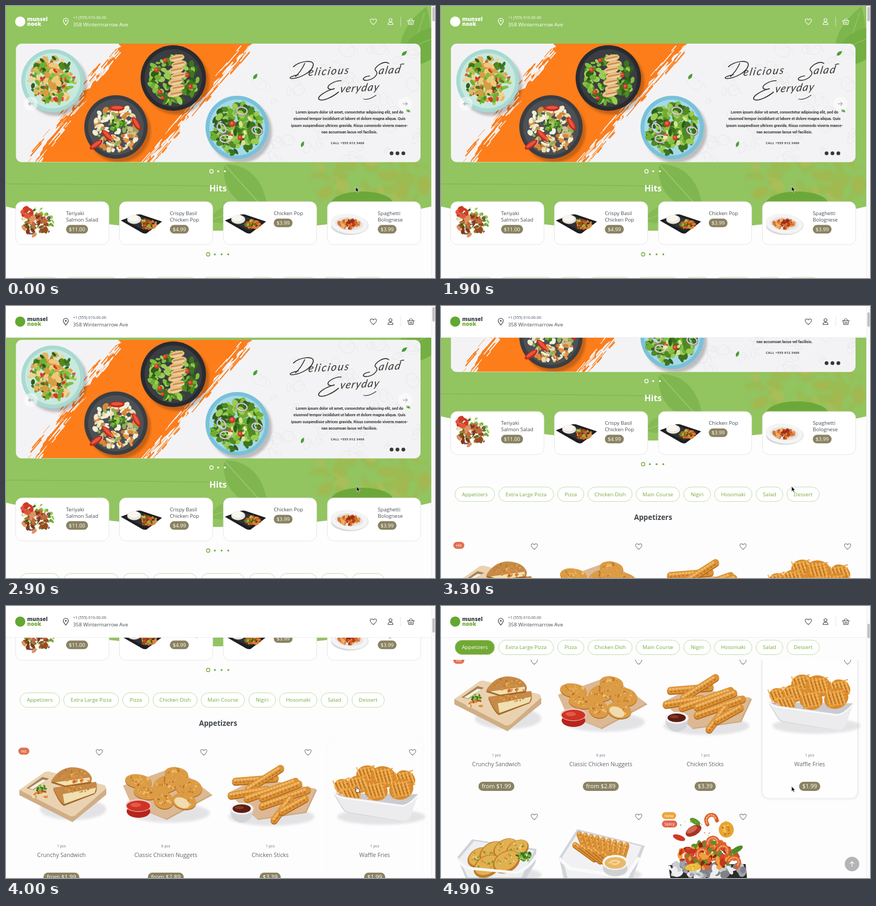
These frames come from a looping animation (800x506 px, 5000 ms). An HTML page:

```html
<!DOCTYPE html>
<html lang="en">
<head>
<meta charset="utf-8">
<title>Food shop</title>
<style>
  html, body { margin: 0; width: 100%; height: 100%; overflow: hidden; background: #fdfdfd; }
  svg { display: block; position: absolute; left: 0; top: 0; }
  text { font-family: "Open Sans", "Noto Sans", sans-serif; }
  .copy { position: absolute; left: 0; top: 0; }
</style>
</head>
<body>
<svg id="stage" width="800" height="506" viewBox="0 0 800 506"></svg>
<script>
const GREEN = '#92c460', LEAF = '#73ab3b', INK = '#474c52', OLIVE = '#8a8261';

let seed = 1;
const rnd = () => (seed = (seed * 16807) % 2147483647) / 2147483647;
const between = (a, b) => a + (b - a) * rnd();
const pick = list => list[Math.floor(rnd() * list.length)];
const n1 = v => v.toFixed(1);

// Drawing helpers return SVG markup.
const el = (x, y, rx, ry, fill, rot = 0, more = '') =>
  `<ellipse rx="${n1(rx)}" ry="${n1(ry)}" fill="${fill}" transform="translate(${n1(x)} ${n1(y)}) rotate(${n1(rot)})" ${more}/>`;
const dot = (x, y, r, fill, more) => el(x, y, r, r, fill, 0, more);
const box = (x, y, w, h, r, fill, more = '') =>
  `<rect x="${x}" y="${y}" width="${w}" height="${h}" rx="${r}" fill="${fill}" ${more}/>`;
const shape = (d, fill, more = '') => `<path d="${d}" fill="${fill}" ${more}/>`;
const line = (d, color, w = 1, more = '') =>
  `<path d="${d}" fill="none" stroke="${color}" stroke-width="${w}" stroke-linecap="round" stroke-linejoin="round" ${more}/>`;
const txt = (x, y, s, size, fill, more = '') =>
  `<text x="${x}" y="${y}" font-size="${size}" fill="${fill}" ${more}>${s}</text>`;
const mid = (x, y, s, size, fill, more = '') => txt(x, y, s, size, fill, 'text-anchor="middle" ' + more);
const at = (x, y, s, more = '') => `<g transform="translate(${x} ${y})" ${more}>${s}</g>`;
const many = (n, f) => Array.from({ length: n }, (_, i) => f(i)).join('');

// Scatter of small rotated blobs inside an ellipse.
function mix(s, n, x, y, rx, ry, colors, lo, hi) {
  seed = s * 7919;
  return many(n, () => {
    const a = between(0, 6.283), d = Math.sqrt(rnd()), r = between(lo, hi);
    return el(x + Math.cos(a) * d * rx, y + Math.sin(a) * d * ry, r, r * between(.4, .8), pick(colors), between(0, 180));
  });
}
const leaf = (x, y, len, w, rot, fill, vein, more = '') =>
  `<g transform="translate(${x} ${y}) rotate(${rot})" ${more}>` +
  shape(`M${-len} 0Q${-len * .2} ${-w * 1.5} ${len} 0Q${-len * .2} ${w * 1.5} ${-len} 0Z`, fill) +
  line(`M${-len} 0H${len * .8}`, vein, len / 40 + .3) + '</g>';
const heart = (x, y, c) => at(x, y, line('M0 5.5C-8-.5-6.5-5-3.3-5C-1.6-5-.5-4 0-3C.5-4 1.6-5 3.3-5C6.5-5 8-.5 0 5.5Z', c, 1.1));
const pill = (x, y, w, s, size, h = 16) =>
  box(x, y - h / 2, w, h, h / 2, OLIVE) + mid(x + w / 2, y + size * .36, s, size, '#fff');
const badge = (x, y, w, s, fill) => box(x, y - 6.5, w, 13, 6.5, fill) + mid(x + w / 2, y + 2.8, s, 7.9, '#fff');
const dots = (x, y, n, c) => dot(x, y, 3.2, 'none', `stroke="${c}" stroke-width="1.4"`) +
  many(n, i => dot(x + 12.5 * (i + 1), y, 1.8, c));

const GREENS = ['#4f8a22', '#6fae32', '#83bf3e', '#3c7420', '#9ccb55', '#2f5d1c'];
const RED = '#cf3a26';

function backdrop() {
  const edge = 'M0 0H793V373Q396 463 0 373Z';
  return `<clipPath id="wave"><path d="${edge}"/></clipPath>` +
    `<filter id="soft"><feGaussianBlur stdDeviation="2"/></filter>` +
    shape(edge, GREEN) + '<g clip-path="url(#wave)">' +
    line('M0 331L180 332L400 335', '#84b652', 1.4) +
    leaf(448, 340, 62, 36, 48, '#7fb64f', '#99c86c') +
    leaf(418, 385, 42, 20, -20, '#85ba54', '#99c86c') +
    '<g filter="url(#soft)" opacity=".5">' +
    mix(3, 95, 690, 318, 125, 58, ['#b3ad3f', '#a5b347', '#c0b852', '#92c460'], 5, 18) + '</g>' +
    el(664, 368, 58, 23, '#6ca839') + leaf(765, 60, 62, 34, -72, '#7cb64c', '#8fc45f') +
    el(780, 75, 48, 27, '#74af43', -35) + line('M735 98Q765 70 793 62', '#8cc05b', 1.5) +
    '</g>';
}

function brush() {
  seed = 4242;
  const edge = (x0, x1) => Array.from({ length: 41 }, (_, i) =>
    `${n1(x0 + (x1 - x0) * i / 40 + between(-5, 5))} ${n1(70 + 5.5 * i)}`);
  const streaks = (x0, x1, c, lo, hi) => many(34, () => {
    const k = rnd(), l = between(7, 24);
    return line(`M${n1(x0 + (x1 - x0) * k + between(lo, hi))} ${n1(70 + 220 * k)}l${n1(-l * .85)} ${n1(l)}`, c, between(.7, 2.6));
  });
  return shape('M' + edge(214, 50).concat(edge(455, 264).reverse()).join('L') + 'Z', '#fd7d1b') +
    streaks(214, 50, '#fd7d1b', -14, 4) + streaks(455, 264, '#fd7d1b', 0, 15) +
    streaks(214, 50, '#f3f3f5', 0, 15) + streaks(455, 264, '#f3f3f5', -14, 5);
}

const plate = (x, y, r, rim, inner) =>
  el(x + 6, y + 7, r, r, '#000', 0, 'opacity=".22" filter="url(#soft)"') + dot(x, y, r, rim) + dot(x, y, r * .88, inner);

function salads() {
  const tomato = (x, y, r = 4.5) => dot(x, y, r, RED) + dot(x - 1, y - 1, r * .45, '#e86a50');
  const wedge = (x, y, a) => el(x, y, 14, 5.5, '#c5281c', a) + el(x, y - 1, 11, 3, '#e4573f', a);
  const slice = i => el(319 - i * .7 + (i % 2) * 4, 97 + i * 11, 14, 6.5, '#e8bd84', -12) +
    line(`M${308 + i % 2 * 4} ${98 + i * 11}l20-4`, '#b4763a', 1.6) + line(`M${310 + i % 2 * 4} ${102 + i * 11}l18-4`, '#f6dcb4', 1.4);
  const ring = (x, y, a) => el(x, y, 10, 7, 'none', a, 'stroke="#e6d5e3" stroke-width="2.4"') +
    el(x, y, 11, 8, 'none', a, 'stroke="#9a5d8c" stroke-width=".8"');
  return plate(87, 139, 58.5, '#a8dad2', '#c9e9df') +
    mix(11, 170, 87, 139, 43, 43, GREENS.concat('#e2b664', '#dca24b', '#efd394'), 3, 8) +
    mix(12, 22, 87, 139, 42, 38, [RED, '#e25039'], 2.5, 5) +
    mix(13, 14, 90, 138, 34, 32, ['#f0c77a', '#d99c42'], 5, 9) +
    plate(312, 134, 61, '#292b2f', '#3a3d42') + mix(14, 150, 312, 136, 45, 45, GREENS, 4, 9) +
    tomato(287, 160) + tomato(281, 119) + tomato(338, 128) + tomato(344, 150) + tomato(292, 171, 3.5) + tomato(297, 101, 4) +
    many(7, slice) +
    plate(205, 225, 59, '#3b3e42', '#4d5054') +
    mix(15, 140, 204, 228, 43, 42, ['#e6dfb4', '#f1edd1', '#cdbf86', '#8fae58', '#d8873a', '#f5f2df'], 3, 7) +
    wedge(207, 190, 0) + wedge(243, 219, 60) + wedge(189, 241, 45) + wedge(168, 258, -35) +
    mix(16, 34, 206, 221, 15, 12, GREENS, 2, 5) + mix(17, 13, 222, 250, 28, 18, ['#d9772a', '#e99442'], 3, 5) +
    plate(431, 226, 59, '#79c1da', '#a5d9e8') + mix(18, 180, 431, 228, 46, 46, GREENS, 4, 9) +
    tomato(422, 219, 6) + tomato(437, 245, 5) + tomato(419, 240, 4) + ring(440, 195, 10) + ring(402, 227, 50) + ring(468, 232, 20) +
    ring(409, 247, 0) + mix(19, 9, 436, 228, 30, 30, ['#e8e8b5', '#d6e391'], 3, 6);
}

function doodles() {
  seed = 90210;
  return many(46, () => {
    const x = between(470, 768), y = between(76, 286), r = between(6, 17);
    return el(x, y, r, r * between(.4, .9), 'none', between(0, 180), 'stroke="#e5e5e8" stroke-width=".8"') +
      line(`M${n1(x)} ${n1(y)}q${n1(r)} ${n1(-r)} ${n1(r * 1.4)} ${n1(r * .6)}`, '#e6e6e9', .8);
  });
}

function headline() {
  const ink = '#34342e';
  const word = (x, y, s, gap) => `<text transform="translate(${x} ${y}) rotate(-3) skewX(-14)" font-size="20" fill="${ink}" letter-spacing="${gap}" style="font-family:Lato,sans-serif;font-weight:400;font-style:italic">${s}</text>`;
  return line('M557 107Q550 122 540 131M536 113C548 102 575 99 573 110C571 123 547 135 532 135C526 134 533 130 545 128', ink, 1.7) +
    line('M714 107C706 99 684 115 689 120C696 124 689 135 675 138C662 140 664 132 678 130', ink, 1.7) +
    line('M625 139C612 139 595 149 602 154C606 157 614 153 612 154C598 157 578 169 584 174C592 178 611 168 620 160', ink, 1.7) +
    line('M735 109q7-2 7-1M690 166q-14 10-23 7', ink, 1.3) +
    word(563, 130, 'elicious', 2) + word(694, 127, 'alad', 1.7) + word(622, 161, 'veryday', 1.2);
}

function banner() {
  const rows = ['Lorem ipsum dolor sit amet, consectetur adipiscing elit, sed do',
    'eiusmod tempor incididunt ut labore et dolore magna aliqua. Quis',
    'ipsum suspendisse ultrices gravida. Risus commodo viverra maece-',
    'nas accumsan lacus vel facilisis.'];
  const copy = rows.map((s, i) =>
    mid(640.5, 199.5 + i * 12.5, s, 7.4, '#3b3b38', 'letter-spacing="-.13" style="font-family:Roboto,sans-serif;font-weight:600"')).join('');
  const arrow = (x, k) => dot(x, 182, 13, '#fff', 'opacity=".5"') + line(`M${x - 4 * k} 182h${8 * k}m${-3.5 * k}-3.5l${3.5 * k} 3.5l${-3.5 * k} 3.5`, '#85878a', 1);
  return '<clipPath id="card"><rect x="18.5" y="70" width="754.5" height="220.5" rx="11"/></clipPath>' +
    '<g clip-path="url(#card)">' + box(18, 70, 756, 221, 0, '#f3f3f5') + doodles() + brush() + salads() + '</g>' +
    leaf(465, 131, 6.5, 4, -55, '#3f9a2c', '#82c35c') + leaf(743, 88, 6.5, 4, -40, '#3f9a2c', '#82c35c') +
    leaf(750, 195, 5, 3, 30, '#4da238', '#82c35c') + leaf(553, 257, 6, 3.6, -65, '#3f9a2c', '#82c35c') +
    headline() + copy +
    mid(637, 256.5, 'CALL +555 012 3400', 6, '#3b3b38', 'font-weight="700" letter-spacing=".3"') +
    [719, 730, 741].map(x => dot(x, 274, 3.5, '#37373a')).join('') +
    arrow(46, -1) + arrow(744.5, 1) + dots(383.2, 307.5, 2, '#fff');
}

function hits() {
  const card = (x, rows, w, price) => box(x, 364, 174, 80, 12, '#fff', 'stroke="#e4e6e2" stroke-width="1"') +
    rows.map((s, i) => txt(x + 94, 388.5 + i * 12, s, 9.55, INK)).join('') +
    pill(x + 94, rows.length > 1 ? 415.3 : 403.5, w, price, 9.7);
  const tray = x => shape(`M${x} 399L${x + 30} 388Q${x + 34} 387 ${x + 38} 388L${x + 77} 401L${x + 48} 423Q${x + 44} 424 ${x + 40} 422Z`, '#1d1e21') +
    shape(`M${x + 8} 400L${x + 34} 391L${x + 70} 402L${x + 46} 418Z`, '#303236') +
    el(x + 25, 397, 13, 8.5, '#e9e6dd') + el(x + 24, 395, 10, 6, '#f8f6f0');
  const dish = (x, s) => tray(x) + mix(s, 32, x + 52, 406, 14, 8, ['#c9601f', '#e07f2f', '#a34717', '#d58c3e'], 2.5, 5) +
    mix(s + 1, 7, x + 50, 405, 15, 8, GREENS, 1.5, 3);
  return mid(395.3, 345, 'Hits', 16.1, '#fff', 'font-weight="700"') +
    card(18, ['Teriyaki', 'Salmon Salad'], 41, '$11.00') +
    card(211.5, ['Crispy Basil', 'Chicken Pop'], 35.5, '$4.99') +
    card(405.3, ['Chicken Pop'], 35, '$3.99') +
    card(599.3, ['Spaghetti', 'Bolognese'], 35, '$3.99') +
    mix(31, 90, 59, 402, 29, 26, GREENS.concat('#c9d68a', '#efe3c4', '#8e3f6c'), 2, 5) +
    mix(32, 30, 55, 408, 23, 20, ['#c0693a', '#9b4a24', '#dd9361', '#7e3a1c'], 4, 7) +
    mix(33, 8, 40, 384, 10, 8, [RED, '#e2553d'], 4, 7) +
    dish(214, 35) + dish(408, 38) +
    el(641, 408, 35, 18, '#d9d9dc') + el(640, 405, 35, 18.5, '#f4f4f5', 6) + el(640, 405, 26, 12, '#e6e4e3', 6) +
    mix(41, 60, 640, 405, 19, 8, ['#d9722f', '#e79a4c', '#b6401f', '#eab069'], 2, 5) + mix(42, 8, 643, 401, 9, 4, ['#9c2c18'], 2, 4) +
    dots(377, 462, 3, LEAF);
}

const FRIED = ['#d9963f', '#c77f2c', '#e6ad58', '#b96f22'];
const nugget = (x, y, rx, ry, a, s) => el(x, y + 1.5, rx, ry, '#a9651f', a) + el(x, y, rx, ry, '#dc9c45', a) +
  mix(s, 26, x, y - 1, rx * .78, ry * .7, FRIED.concat('#efc071'), 1, 3.2);
const stick = (d, w = 13) => line(d, '#b0661c', w, 'transform="translate(0 2)"') + line(d, '#dd9337', w) +
  line(d, '#efb866', w * .35, 'stroke-dasharray="1 5" transform="translate(-1 -2)"') +
  line(d, '#c47a27', w * .3, 'stroke-dasharray=".5 7" transform="translate(1 2.5)"');
const paper = d => shape(d, '#cfa77c') + shape(d, '#dcb994', 'transform="translate(-2 -2)"');
const ground = (x, y, rx, ry) => el(x, y, rx, ry, '#9a9a9e', 0, 'opacity=".25" filter="url(#soft)"');

function sandwich() {
  const slab = d => shape(d, '#a2672c', 'transform="translate(0 3)"') + shape(d, '#c68a48');
  return ground(125, 378, 62, 20) +
    shape('M25 342L25 352L124 402L187 351V340Z', '#cfae86') + shape('M25 342L72 309Q76 307 80 308L183 333Q189 336 184 342L130 389Q124 393 118 390Z', '#ead2b0') +
    shape('M38 339L68 318L80 321L51 342Z', '#a5825c') + shape('M43 339L68 323L76 324L50 341Z', '#f7efe2') +
    slab('M88 338L168 327Q172 340 165 347L108 369Q99 364 88 338Z') + shape('M106 350L168 338L165 348L109 368Z', '#f0dfb0') +
    slab('M84 326Q98 302 122 300Q152 300 160 319L158 327L110 334Z') + shape('M92 328L156 319L156 327L110 334Z', '#f2e1b1') +
    mix(51, 24, 126, 341, 32, 7, FRIED, 1, 3) + mix(52, 30, 122, 313, 28, 8, FRIED, 1, 3) +
    mix(53, 9, 130, 325, 26, 3, ['#c75a22', '#e08a3f'], 2, 4) + mix(54, 20, 66, 339, 9, 6, GREENS, 2, 4) +
    mix(55, 14, 66, 352, 17, 7, ['#d98a3a', '#efd9a8', '#f3e6c8', '#b5562a'], 3, 5);
}
const nuggets = () => ground(305, 385, 75, 18) + paper('M220 336L318 301L385 352L300 398L236 372Z') +
  nugget(318, 312, 22, 12, 10, 61) + nugget(247, 326, 25, 13, 8, 62) + nugget(300, 331, 26, 16, -15, 63) + nugget(341, 338, 25, 17, 10, 64) +
  nugget(262, 347, 24, 13, 8, 65) + nugget(294, 361, 19, 16, 20, 66) + nugget(332, 363, 23, 15, 12, 67) + el(328, 366, 15, 9, '#f0dcae', 25) +
  el(247, 382, 22, 12, '#b6241c') + el(247, 371, 24, 12, '#ecc6bd') + el(247, 372, 22, 10, '#cf3325') + el(242, 370, 10, 4, '#e3594a');
const sticks = () => ground(495, 392, 80, 17) + paper('M416 350L470 322L580 342L560 385L470 398Z') +
  stick('M428 326L502 320') + stick('M452 340L512 302') + stick('M420 352L486 341') + stick('M450 358L540 326') + stick('M478 357L546 331') +
  stick('M478 372L562 342') + stick('M500 398L530 358') + stick('M515 382L558 358') +
  shape('M418 378Q420 402 440 403Q459 402 461 378Z', '#d3d4d8') + el(439.5, 377, 22, 11, '#f3f3f5') + el(439.5, 377, 17, 8, '#5c1d12') +
  el(435, 375, 9, 3, '#8c3522');
function fries() {
  const waffle = (x, y, r, a) => el(x, y, r, r * .82, '#d98a2d', a) +
    at(x, y, many(5, i => line(`M${(i - 2) * 7 - 5} ${-r * .62}l8 ${r * 1.15}`, '#f0b75c', 2.2) + line(`M${-r * .7} ${(i - 2) * 6 + 4}l${r * 1.4}-8`, '#e9a548', 2)) +
      many(4, i => line(`M${(i - 1.5) * 7 - 4} ${-r * .4}l6 ${r * .8}`, '#ad641b', 1.2)));
  return ground(700, 392, 82, 15) +
    shape('M610 348L768 350L750 393Q746 400 737 400L640 385Q631 383 628 378Z', '#c9cbd0') +
    waffle(629, 336, 17, 20) + waffle(673, 313, 20, -10) + waffle(704, 318, 24, 15) + waffle(745, 322, 19, 30) + waffle(657, 332, 20, 0) +
    waffle(737, 341, 23, -20) + waffle(690, 344, 22, 10) + waffle(645, 350, 16, 10) +
    shape('M610 346L624 354L740 370Q760 366 769 350L754 393Q750 400 739 400L640 384Q632 382 629 377Z', '#ececef') +
    line('M612 349Q618 355 628 357L738 372Q752 370 767 353', '#fbfbfc', 2.5);
}
const bread = () => ground(118, 500, 70, 14) + shape('M30 468L58 434L178 452L176 478L150 520H52Z', '#cfd2d6') +
  shape('M34 470L62 437L174 455L150 505H50Z', '#eeeff1') +
  [[72, 468, 24], [97, 459, 27], [121, 452, 25], [143, 452, 22], [86, 484, 27], [122, 476, 27]].map(([x, y, r], i) =>
    el(x, y, r, r * .72, '#bd7c2c', -30) + el(x, y - 2, r * .9, r * .6, '#e3b050', -30) +
    mix(71 + i, 14, x, y - 2, r * .7, r * .45, ['#f2d486', '#7a9a34', '#cf9438'], 1, 3)).join('') +
  mix(78, 34, 156, 466, 14, 9, GREENS, 2, 4) +
  line('M31 471Q40 486 54 488L140 496Q165 488 177 465', '#f9f9fa', 5);
const breadsticks = () => ground(300, 500, 74, 14) + shape('M220 468L254 415L380 446L352 520H232Z', '#d2d4d8') +
  shape('M226 467L257 419L374 447L350 506H236Z', '#f1f1f3') +
  many(9, i => stick(`M${258 + i * 11} ${424 + i * 2.6}L${268 + i * 9} ${449 + i * 2}`, 10)) +
  many(5, i => stick(`M${250 + i * 13} ${444 + i * 4}L${286 + i * 11} ${470 + i * 4}`, 10)) +
  line('M222 471L240 488L345 504L368 470', '#fafafb', 6) +
  el(325, 488, 23, 15, '#cfd0d4') + el(325, 477, 24, 14, '#f6f6f7') + el(325, 478, 20, 11, '#e9b969') + line('M314 478q8-8 19-2q-6 7-14 3', '#f8dda5', 2.5);
function grill() {
  const shrimp = (x, y, a) => `<g transform="translate(${x} ${y}) rotate(${a})">` + line('M-9 5Q-10-9 2-9Q13-7 10 6', '#d95f2c', 7) +
    line('M-9 3Q-9-8 2-9Q11-7 9 4', '#f3a06a', 3, 'stroke-dasharray="2 3"') + '</g>';
  return shape('M424 482L568 480L572 520H430Z', '#2b2a2b') +
    mix(81, 100, 496, 488, 72, 17, ['#c9ccd0', '#9ea2a8', '#eceef0', '#7e8288'], 4, 10) +
    mix(82, 130, 499, 464, 54, 24, ['#c2371d', '#e2622c', '#f0a03c', '#8e2414', '#5f8f2b', '#d8452c'], 4, 9) +
    shrimp(503, 398, -25) + el(471, 418, 16, 9, '#a83422', -30) + el(468, 416, 11, 5, '#d26650', -30) + el(532, 416, 14, 15, '#e7a531') +
    mix(83, 16, 532, 416, 9, 10, ['#f4c75c', '#cb8722'], 1.5, 3) + el(474, 401, 11, 5, '#5d9a2c', 30) + el(552, 453, 12, 5, '#4c8c28', -30) +
    el(444, 431, 12, 5, RED, 20) + shrimp(525, 455, 20) + shrimp(486, 462, -40) + shrimp(546, 476, 35) + shrimp(506, 440, 0) +
    el(470, 486, 15, 7, '#eebb3a', -5) + mix(84, 16, 470, 486, 11, 4, ['#f8d869', '#d29a22'], 1, 2) +
    mix(85, 14, 500, 420, 60, 32, ['#e48a35', '#8fb44a', '#c7432b'], .8, 1.8);
}

const COLS = [103.3, 298, 492.6, 687.5];
function products() {
  const items = [['1 pcs', 'Crunchy Sandwich', 'from $1.99', 67], ['6 pcs', 'Classic Chicken Nuggets', 'from $2.89', 67],
    ['1 pcs', 'Chicken Sticks', '$3.39', 39.5], ['1 pcs', 'Waffle Fries', '$1.99', 39.5]];
  return mid(395.5, 566, 'Appetizers', 13.4, '#3f444a', 'font-weight="700"') +
    `<g id="hover">${box(598, 593, 180, 278, 12, '#e9e9ec', 'filter="url(#soft)"')}${box(600, 594, 176, 275, 11, '#fefefe')}</g>` +
    at(0, 343, sandwich() + nuggets() + sticks() + fries()) +
    at(0, 512, bread() + breadsticks() + grill()) +
    COLS.map((x, i) => heart(x + 70.7, 615, '#75787c') + (i < 3 ? heart(x + 70.7, 904, '#75787c') : '') +
      mid(x, 792, items[i][0], 7, '#6b6f74') + mid(x, 809.7, items[i][1], 10.55, '#62676c') +
      pill(x - items[i][3] / 2, 847.5, items[i][3], items[i][2], 10.8, 17)).join('') +
    badge(23, 613, 20.5, 'Hit', '#df7150') + badge(412, 902, 26.5, 'New', '#eda43c') + badge(412, 917.5, 28.5, 'Spicy', '#e1654f');
}

function categories() {
  const tabs = [['Appetizers', 26, 74], ['Extra Large Pizza', 107.5, 102.5], ['Pizza', 217.5, 49], ['Chicken Dish', 274, 82.5],
    ['Main Course', 363.7, 81.3], ['Nigiri', 452.7, 50], ['Hosomaki', 510, 70], ['Salad', 587.5, 50], ['Dessert', 645, 60.5]];
  const tab = ([s, x, w], fill, ink) => box(x, .5, w, 27, 13.5, fill, 'stroke="#c3dbaa" stroke-width="1"') + mid(x + w / 2, 17.4, s, 9.75, ink);
  return tabs.map(t => tab(t, '#fff', LEAF)).join('') + `<g id="active">${tab(tabs[0], '#72a935', '#fff')}</g>`;
}

function header(ink, mark, top, low, rule) {
  return dot(26.5, 29, 9.5, mark) +
    txt(39.5, 27.5, 'munsel', 10, top, 'font-weight="800"') + txt(39.5, 37, 'nook', 10, low, 'font-weight="800"') +
    line('M111.5 35.5Q106.8 30 106.8 27.5A4.7 4.7 0 0 1 116.2 27.5Q116.2 30 111.5 35.5Z', ink, 1.3) + dot(111.5, 27.5, 1.6, ink) +
    txt(125, 24, '+1 (555) 010-00-00', 7.2, ink) + txt(125, 38.2, '358 Wintermarrow Ave', 9.6, ink) +
    heart(685, 29, ink) + dot(717, 26.3, 2.8, 'none', `stroke="${ink}" stroke-width="1.2"`) +
    line('M712.5 34.5Q712.5 30.5 715.5 30.5H718.5Q721.5 30.5 721.5 34.5Z', ink, 1.2) + line('M736 20.5V37.5', rule, 1) +
    line('M748.5 27.5H761.5M749.7 28L751 34.5H759L760.3 28M751.5 27L754 23.5M758.5 27L756 23.5M753 30V32.5M755 30V32.5M757 30V32.5', ink, 1.1);
}

document.getElementById('stage').innerHTML =
  box(0, 0, 800, 506, 0, '#fdfdfe') +
  `<g id="page">${backdrop()}${banner()}${hits()}${products()}</g>` +
  `<g id="tabs"><g id="tabsBack">${box(0, -6, 793, 43, 0, '#fdfdfe')}</g>${categories()}</g>` +
  `<g id="light">${header('#fff', '#fff', '#fff', '#fff', '#cfe4bb')}</g>` +
  `<g id="dark">${box(0, 0, 793, 59, 0, '#eeeeef')}${box(0, 0, 793, 58, 0, '#fff')}${header(INK, '#62a832', '#3d4145', '#6dac30', '#e3e4e6')}</g>` +
  `<g id="up">${dot(766.5, 480, 13.5, '#b4b4b6')}${line('M766.5 484.5V476M763 479.2L766.5 475.7L770 479.2', '#fff', 1.2)}</g>` +
  box(793, 0, 7, 506, 0, '#fafafa') + box(793, 0, .6, 506, 0, '#e6e6e6') +
  `<g id="thumb">${box(795, 0, 4.6, 27, 2.3, '#c1c1c2')}</g>` +
  `<g id="arrow">${shape('M0 0V9.6L2.2 7.6L3.8 11L5.4 10.3L3.9 7H6.8Z', '#111', 'stroke="#fff" stroke-width=".7"')}</g>` +
  `<g id="hand">${shape('M652.6 336.6q1.3-.9 2 .6l.8 2.6q3.6-.3 4 2.4q.3 2.8-1.3 4.8h-4q-2-1.6-3-4.2q.5-1.2 2-.2z', '#fff', 'stroke="#222" stroke-width=".9"')}</g>`;

const $ = id => document.getElementById(id);
const smooth = k => k * k * (3 - 2 * k);
const part = (t, a, b) => Math.min(1, Math.max(0, (t - a) / (b - a)));
// start, end, from, to, ease power
const SCROLLS = [[2300, 2500, 0, 7, 1], [3000, 4000, 7, 343, .6], [4200, 4900, 343, 512, .8]];
const scrollAt = t => SCROLLS.reduce((y, [a, b, from, to, p]) => y + (to - from) * smooth(Math.pow(part(t, a, b), p)), 0);
const move = (id, x, y) => $(id).setAttribute('transform', `translate(${x} ${y.toFixed(2)})`);
const fade = (id, k) => $(id).setAttribute('opacity', k);

function draw(now) {
  const t = Math.floor(now % 5000 / 100) * 100;
  const y = scrollAt(t), white = part(t, 2300, 2600), hand = t >= 3900 && t < 4300;
  move('page', 0, -y);
  move('tabs', 0, Math.max(504 - y, 63));
  move('thumb', 0, 1.5 + y * .0615);
  move('arrow', t < 400 ? 652 : 653.8, t < 400 ? 336.5 : 335.5);
  fade('tabsBack', y > 441 ? 1 : 0);
  fade('active', part(y, 445, 475));
  fade('light', 1 - white);
  fade('dark', white);
  fade('up', part(y, 400, 460));
  fade('hover', part(t, 3950, 4300));
  fade('arrow', hand ? 0 : 1);
  fade('hand', hand ? 1 : 0);
  requestAnimationFrame(() => draw(performance.now() - start));
}
const start = performance.now();
draw(0);
</script>
</body>
</html>
```
